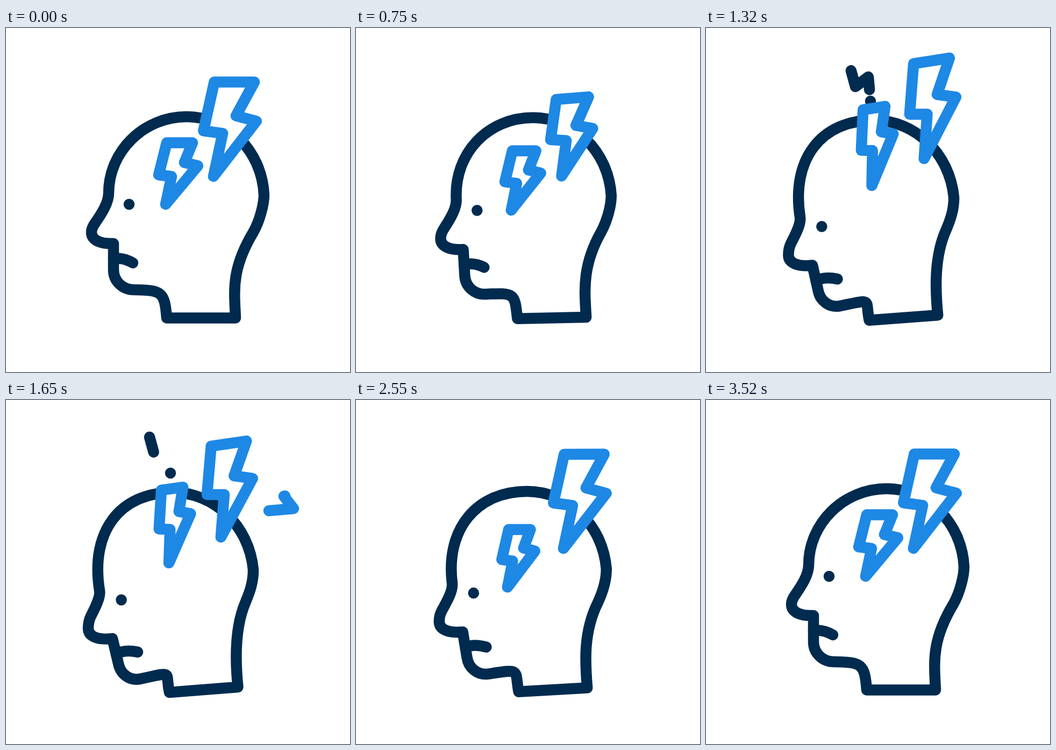
An HTML page for the animation above (3550 ms loop, 640 by 640 pixels).

```html
<!DOCTYPE html>
<html lang="en">
<head>
<meta charset="utf-8">
<title>Headache</title>
<style>
  html, body { margin: 0; width: 100%; height: 100%; overflow: hidden; background: #fff; }
  svg { display: block; width: 100%; height: 100%; }
  path { fill: none; stroke: #002b4e; stroke-width: 20.5; stroke-linecap: round; stroke-linejoin: round; }
  .blue { stroke: #1e88e5; }
  .bolt { fill: #fff; }
</style>
</head>
<body>
<svg viewBox="0 0 640 640">
  <path id="head"/>
  <path id="mouth"/>
  <circle id="eye" r="10.3" fill="#002b4e"/>
  <path id="darkSpark" pathLength="1" d="M306 136L302 91L278 109L267 69"/>
  <path id="blueSpark" class="blue" pathLength="1" d="M489 206L535 202L517 179L557 167"/>
  <path id="smallBolt" class="blue bolt"/>
  <path id="bigBolt" class="blue bolt"/>
</svg>
<script>
const LOOP = 3550, HALF = LOOP / 2;
const $ = id => document.getElementById(id);
const clamp = v => Math.min(1, Math.max(0, v));
const mix = (a, b, k) => a + (b - a) * k;
const smooth = u => u * u * (3 - 2 * u);
const progress = (t, start, length) => clamp((t - start) / length);

// cubic-bezier(a, 0, 1 - a, 1), solved by bisection
function ease(x, a = 0.74) {
  let lo = 0, hi = 1;
  for (let i = 0; i < 24; i++) {
    const s = (lo + hi) / 2, r = 1 - s;
    if (3 * a * s * r * r + 3 * (1 - a) * s * s * r + s ** 3 < x) lo = s; else hi = s;
  }
  return smooth(lo);
}

// Upright and bowed poses with matching commands
const headPoses = [
  `M299 539.5L427 539.5C425 490 418 450 460 380C472 359 480 328 480 310
   C476 228 412 165 336 165C256 165 191 230 191 307C191 325 178 345 167 361
   C161 369 159 375 159 380C159 395 176 402 200 401L200 450
   C200 471 217 487 238 487C290 488 295 490 299 539.5Z`,
  `M304 544L431.5 534C427 490 424 425 446 375C453 358 460 340 460 316
   C452 232 386 172 311 172C212 172 156 244 174 355C176 368 165 388 158 402
   C154 410 153 418 153 425C153 441 172 447 198 444L209 490
   C213 511 231 523 250 519C315 505 295 505 304 544Z`
];
const mouthPoses = [
  'M200 429C212 427 224 430 236 437',
  'M205 473C217 466 230 466 245 469'
];

function blendPath([from, to], k) {
  const target = to.match(/[\d.]+/g);
  let i = 0;
  return from.replace(/[\d.]+/g, n => mix(+n, +target[i++], k).toFixed(2));
}

// A bolt is an affine outline; each key is [time, top-left, top-right, tip]
const bigBolt = {
  shape: [[0, 0], [1, 0], [.551, .358], [1.059, .415], [0, 1], [.22, .545], [-.26, .517]],
  keys: [
    [333, 387.5, 100.5, 462, 100.5, 386, 276],
    [990, 366, 147, 420, 140, 381, 275],
    [1393, 388, 59, 456, 48, 408, 240],
    [2160, 364, 161, 423, 155.5, 377, 297],
    [2570, 387.5, 100.5, 462, 100.5, 386, 276]
  ]
};
const smallBolt = {
  shape: [[0, 0], [1, 0], [.7, .322], [1.22, .374], [0, 1], [.21, .548], [-.29, .522]],
  keys: [
    [480, 299, 213.5, 347, 213.5, 297, 328],
    [990, 284, 241, 324.5, 241, 282, 348],
    [1393, 293, 144, 334, 137, 311, 288],
    [2160, 278, 234, 316, 232.5, 281, 345],
    [2550, 284, 241, 324.5, 241, 282, 348],
    [3200, 299, 213.5, 347, 213.5, 297, 328]
  ]
};

function boltPath({ shape, keys }, t) {
  let i = 0;
  while (i < keys.length - 2 && t > keys[i + 1][0]) i++;
  const [a, b] = [keys[i], keys[i + 1]];
  const k = smooth(progress(t, a[0], b[0] - a[0]));
  const [, x, y, rx, ry, tx, ty] = a.map((v, n) => mix(v, b[n], k));
  return 'M' + shape.map(([u, v]) =>
    `${x + u * (rx - x) + v * (tx - x)} ${y + u * (ry - y) + v * (ty - y)}`).join('L') + 'Z';
}

function drawSpark(el, t) {
  const start = progress(t, 280, 580), end = progress(t, 0, 425);
  el.style.display = end > start ? '' : 'none';
  el.setAttribute('stroke-dasharray', `0 ${start} ${Math.max(0, end - start)} 2`);
}

function draw(t) {
  const bow = ease(1 - Math.abs(t / HALF - 1));
  $('head').setAttribute('d', blendPath(headPoses, bow));
  $('mouth').setAttribute('d', blendPath(mouthPoses, bow));
  $('eye').setAttribute('cx', mix(229, 214.5, bow));
  $('eye').setAttribute('cy', mix(328, 372, bow));
  $('bigBolt').setAttribute('d', boltPath(bigBolt, t));
  $('smallBolt').setAttribute('d', boltPath(smallBolt, t));
  drawSpark($('darkSpark'), t - 935);
  drawSpark($('blueSpark'), t - 1370);
}

const began = performance.now();
function tick() {
  draw((performance.now() - began) % LOOP);
  requestAnimationFrame(tick);
}
tick();
</script>
</body>
</html>
```
